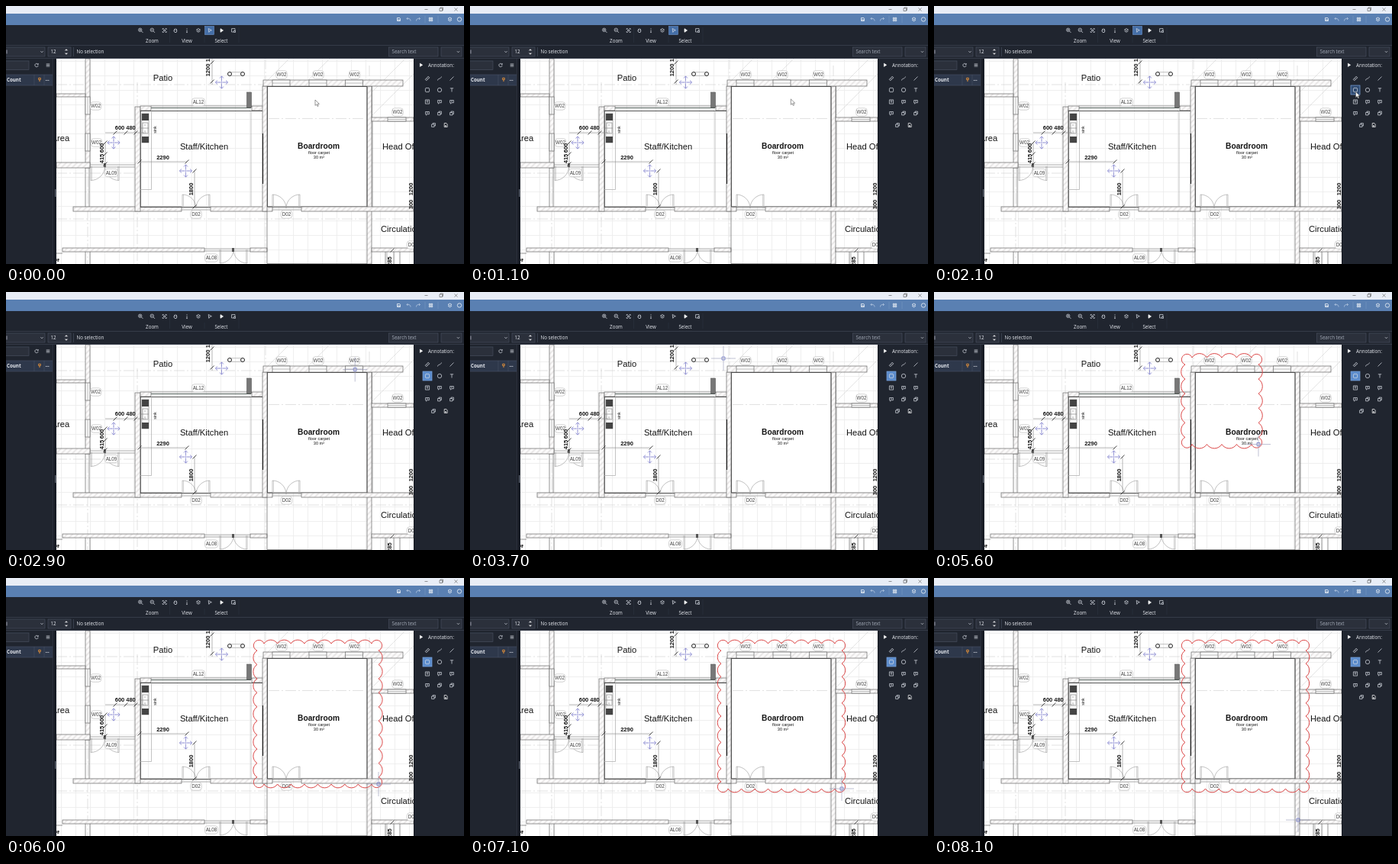
An HTML page that plays this animation: 600x338 px, repeating every 8.2 s.

```html
<!DOCTYPE html>
<html lang="en">
<head>
<meta charset="utf-8">
<title>Revision cloud on a floor plan</title>
<style>
  html, body { margin: 0; width: 100%; height: 100%; overflow: hidden; background: #20252f; }
  svg { display: block; width: 600px; height: 338px; }
  .ui { font-family: "Open Sans", sans-serif; fill: #e9ecf2; }
  .plan { font-family: "Liberation Sans", Arial, sans-serif; fill: #151515; }
</style>
</head>
<body>
<svg id="stage" viewBox="0 0 600 338">
  <defs>
    <pattern id="hatch" width="5" height="5" patternUnits="userSpaceOnUse" patternTransform="rotate(45)">
      <rect width="5" height="5" fill="#fbfafa"/><path d="M1 0V5" stroke="#cbc6c6" stroke-width=".7"/>
    </pattern>
    <pattern id="tiles" x="72" y="72" width="19" height="19" patternUnits="userSpaceOnUse">
      <path d="M.5 0V19M0 .5H19" stroke="#ebebeb" stroke-width=".8"/>
    </pattern>
    <clipPath id="sheet"><rect x="66" y="69" width="468" height="269"/></clipPath>
  </defs>
</svg>
<script>
const stage = document.getElementById('stage');

// Markup helpers
const path = (d, stroke = '#666', width = .7, extra = '') =>
  `<path d="${d}" fill="none" stroke="${stroke}" stroke-width="${width}" ${extra}/>`;
const rect = (x, y, w, h, fill, extra = '') =>
  `<rect x="${x}" y="${y}" width="${w}" height="${h}" fill="${fill}" ${extra}/>`;
const text = (x, y, str, size, { anchor = 'middle', bold, turn, kind = 'plan', fill } = {}) =>
  `<text class="${kind}" x="${x}" y="${y + size * .36}" font-size="${size}" text-anchor="${anchor}"` +
  (bold ? ' font-weight="700"' : '') + (fill ? ` style="fill:${fill}"` : '') +
  (turn ? ` transform="rotate(-90 ${x} ${y})"` : '') + `>${str}</text>`;
const ui = (x, y, str, opts) => text(x, y, str, 6.2, { kind: 'ui', anchor: 'start', ...opts });
const at = (x, y, body, extra = '') => `<g transform="translate(${x} ${y})" ${extra}>${body}</g>`;

const wall = (x, y, w, h) => rect(x, y, w, h, 'url(#hatch)', 'stroke="#666" stroke-width=".7"');
// Window across a wall, glazed along its longer side
const pane = (x, y, w, h) => rect(x, y, w, h, '#fff', 'stroke="#666" stroke-width=".7"') +
  path(w > h ? `M${x} ${y + h / 2}h${w}` : `M${x + w / 2} ${y}v${h}`, '#888', .6);
const dim = (x, y, str, turn) => text(x, y, str, 7.5, { bold: true, turn });
const tag = (x, y, str) => {
  const w = str.length > 3 ? 17 : 14.5;
  return rect(x - w / 2, y - 5.2, w, 10.4, '#fff', 'rx="3.5" stroke="#b4b4b4" stroke-width=".6"') +
    text(x, y, str, 6.3, { fill: '#444' });
};
const tick = (x, y) => path(`M${x - 2.5} ${y + 2.5}l5 -5`, '#222', .8);
const moveMark = (x, y) => at(x, y, [0, 90, 180, 270].map(a =>
  path('M0 -2V-8M-2.5 -5.5L0 -8.2L2.5 -5.5', '#8c8cd2', .9, `transform="rotate(${a})"`)).join('') +
  path('M-3 0H3M0 -3V3', '#a0a0da', .7));
// Double door hinged at both ends; dir is the side it opens to
const doors = (x, y, w, dir) => {
  const r = w / 2, h = dir * r, s = dir < 0 ? [1, 0] : [0, 1];
  return path(`M${x} ${y}v${h}A${r} ${r} 0 0 ${s[0]} ${x + r} ${y}A${r} ${r} 0 0 ${s[0]} ${x + w} ${y + h}v${-h}`, '#999', .6) +
    path(`M${x + 1.5} ${y}v${h}M${x + w - 1.5} ${y}v${h}`, '#aaa', .5);
};

function drawPlan() {
  const dash = 'stroke-dasharray="14 3 2 3"';
  return rect(66, 69, 468, 269, '#fff') + rect(66, 69, 468, 269, 'url(#tiles)') +
    rect(342, 105, 131, 158, '#fff') +
    path('M66 103H337M66 219H170M66 279H534M107 69V338M172 100V338M340 69V338M476 78V338M344 147.5H471', '#cfcfcf', .6, dash) +
    path('M343 97L371 69M396 97L424 69M480 112L523 69M480 143L534 89', '#d2d2d2', .6) +
    // Outer rooms
    wall(104, 69, 6, 143) + wall(66, 205, 44, 7) + wall(66, 115, 38, 4) +
    pane(104, 119, 6, 23) + pane(104, 167, 6, 23) +
    path('M104 212V263M109 212V263') + wall(88, 263, 142, 6) +
    wall(74, 317, 186, 5) + wall(320, 317, 22, 5) + path('M104 322V338M110 322V338M66 324H74') +
    // Kitchen
    wall(169, 132, 7, 137) + wall(176, 131, 14, 6) + wall(322, 131, 18, 6) +
    path('M176 137.5H337M176 263.5H336M176.3 137V263', '#444', .9) + path('M190 131H322') +
    path('M190 133.5H321', '#53605b', 1.2) +
    wall(268, 263, 81, 6) + path('M230 264H268M230 267H268', '#888') +
    path('M190.5 137V240.5H176M321 137V263', '#aaa') +
    rect(178, 141, 9, 38, '#fff', 'stroke="#777" stroke-width=".6"') +
    rect(178, 141, 9, 9, '#444') + rect(178, 171, 9, 8, '#444') +
    path('M179 153H186V167H179ZM177 160H187M181 156h2M181 164h2', '#888', .7) +
    text(195, 162, 'sink', 5.4, { turn: true }) +
    rect(315.5, 113, 6, 20, '#777', 'stroke="#555" stroke-width=".6"') +
    // Boardroom
    wall(336, 105, 6, 164) + wall(473, 105, 6, 233) + wall(337, 97, 183, 8) +
    [349, 397, 444.5].map(x => pane(x, 97, 23, 8)).join('') +
    path('M342.5 105V263H473V105.5H342', '#444', .9) + path('M336.5 167V233', '#222', 1.2) +
    wall(387, 263, 147, 6) + path('M349 264H387M349 267H387', '#888') +
    path('M342 269V337.5H473') +
    // Right side rooms
    wall(479, 146, 55, 5) + pane(500, 146, 24, 5) +
    path('M479.5 105V146M480 151V263') + wall(479, 317, 55, 5) + path('M497 322V338M508 322V338M516 322V338') +
    // Doors
    doors(231, 265, 36, -1) + doors(349, 265, 36, -1) + doors(111, 210, 37, 1) + doors(280, 319, 36, 1) +
    path('M110 208H169M110 211H169M260 318H320M260 321H320', '#888') +
    rect(128, 206, 3, 5, '#555') + rect(296, 317, 3, 5, '#555') +
    // Bench and move marks
    path('M293 86.7H310M293 91.3H310', '#999', .6) +
    [293, 310].map(x => `<circle cx="${x}" cy="89" r="2.5" fill="#fff" stroke="#222"/>`).join('') +
    moveMark(141, 179) + moveMark(282.5, 100) + moveMark(235.5, 216) +
    // Tags and dimensions
    [[361, 90, 'W02'], [409, 90, 'W02'], [456.5, 90, 'W02'], [117.5, 131, 'W02'], [118.5, 179, 'W02'],
     [513, 139, 'W02'], [252, 126, 'AL12'], [138, 218.5, 'AL09'], [269, 330, 'AL08'], [249, 273, 'D02'],
     [367.5, 273, 'D02'], [532.5, 313, 'D02']].map(t => tag(...t)).join('') +
    path('M130 166H184M176 204H237M247 216V263M130 179V212M270 69V103M499 322V338', '#888', .6) +
    [[143, 166], [157, 166], [170, 166], [175, 204], [237, 204], [247, 216], [247, 263], [130, 179],
     [130, 194], [130, 207], [270, 74], [270, 99], [506, 320]].map(p => tick(...p)).join('') +
    dim(149, 159, '600') + dim(163.5, 159, '480') + dim(205.5, 198, '2290') + dim(242, 240, '1800', 1) +
    dim(125, 200, '415', 1) + dim(125, 186, '600', 1) + dim(264.5, 84, '1200', 1) + dim(264.5, 65, '1200', 1) +
    dim(530.5, 240, '1200', 1) + dim(530.5, 260, '300', 1) + dim(502, 334.5, '285', 1) + dim(67.5, 333, '4', 1) +
    // Room names
    text(205.5, 94, 'Patio', 11.2) + text(259.5, 183.5, 'Staff/Kitchen', 11.2) +
    text(409.5, 183.5, 'Boardroom', 10.2, { bold: true }) + text(410, 191.7, 'floor carpet', 5.6) +
    text(410, 198.3, '30 m²', 5.6) + text(59.5, 173, 'Area', 11.2, { anchor: 'start' }) +
    text(493, 183.5, 'Head Office', 11.2, { anchor: 'start' }) +
    text(491, 292, 'Circulation', 11.2, { anchor: 'start' });
}

const glyphs = {
  zoomIn: 'M-3 -.7a2.2 2.2 0 1 0 4.4 0a2.2 2.2 0 1 0 -4.4 0M1 1L3 3M-2 -.7H.4M-.8 -1.9V.5',
  zoomOut: 'M-3 -.7a2.2 2.2 0 1 0 4.4 0a2.2 2.2 0 1 0 -4.4 0M1 1L3 3M-2 -.7H.4',
  fit: 'M-2.5 -1V-2.5H-1M1 -2.5H2.5V-1M2.5 1V2.5H1M-1 2.5H-2.5V1M-1 -1H1V1H-1Z',
  hand: 'M-1.5 .5V-2M0 0V-2.8M1.5 .5V-2M-2.5 0L-1 2.5H1.2L2 0',
  info: 'M0 -2.8V-1.6M0 -.6V2.8M-.7 2.6H.7',
  layers: 'M0 -2.5L2.5 -1L0 .5L-2.5 -1ZM-2.5 .8L0 2.3L2.5 .8',
  pointer: 'M-1.8 -2.5L2.4 -.2L0 .4L-1.2 2.4Z',
  play: 'M-1.5 -2.3L2 0L-1.5 2.3Z',
  area: 'M-2.4 -2.4H2V1M-2.4 -2.4V2H0M.5 .5H2.5V2.5H.5Z',
  ruler: 'M-2.8 1.2L1.2 -2.8L2.8 -1.2L-1.2 2.8ZM-1 0L0 1M.5 -1.5L1.5 -.5',
  curve: 'M-2.5 2.5C-2 -1 1 1.5 2.5 -2.5',
  slash: 'M-2.5 2.5L2.5 -2.5',
  box: 'M-2 -2.6H2L2.6 -2V2L2 2.6H-2L-2.6 2V-2Z',
  ring: 'M-2.7 0a2.7 2.7 0 1 0 5.4 0a2.7 2.7 0 1 0 -5.4 0',
  type: 'M-2.2 -2.2H2.2M0 -2.2V2.5',
  textBox: 'M-2.6 -2.6H2.6V2.6H-2.6ZM-1.3 -1.2H1.3M0 -1.2V1.5',
  note: 'M-2.4 -2H2.4V1.2H0L-1.6 2.6V1.2H-2.4ZM-1 -.5H1',
  stamp: 'M-2.4 -1H1V2.4H-2.4ZM-1 -1V-2.4H2.4V1H1',
  page: 'M-1.8 -2.5H1L2.2 -1V2.5H-1.8ZM0 0V2M-1 1H1',
  save: 'M-2 -2H1.3L2 -1.2V2H-2ZM-.9 2V.3H.9V2',
  undo: 'M2.5 2C2.5 -1 0 -1.2 -2.4 -1M-1 -2.5L-2.5 -1L-1 .5',
  redo: 'M-2.5 2C-2.5 -1 0 -1.2 2.4 -1M1 -2.5L2.5 -1L1 .5',
  grid: 'M-2.2 -2.2H-.4V-.4H-2.2ZM.4 -2.2H2.2V-.4H.4ZM-2.2 .4H-.4V2.2H-2.2ZM.4 .4H2.2V2.2H.4Z',
  refresh: 'M2 -1A2.2 2.2 0 1 0 2.2 .6M2.2 -2.5V-.8H.6',
  menu: 'M-2.3 -1.6H2.3M-2.3 0H2.3M-2.3 1.6H2.3',
  down: 'M-1.6 -.8L0 .8L1.6 -.8',
  up: 'M-1.6 .8L0 -.8L1.6 .8'
};
const icon = (x, y, name, color = '#dce0e8', fill) =>
  at(x, y, path(glyphs[name], color, .7, fill ? `style="fill:${color}"` : ''));
const iconRow = (y, x, step, names) => names.split(' ').map((n, i) => icon(x + i * step, y, n)).join('');
const field = (x, y, w, h) => rect(x, y, w, h, '#2b303b', 'stroke="#4b5363" stroke-width=".6"');

function drawApp() {
  return rect(0, 0, 600, 338, '#20252f') + rect(0, 0, 600, 10, '#e8edf6') + rect(0, 10, 600, 15, '#5a80b2') +
    path('M548.5 4.5H552.5M568 3H571.5V6.5H568ZM569 3V2H572.5V5.5H571.5M587.5 2.5L591.5 6.5M591.5 2.5L587.5 6.5', '#555', .6) +
    icon(514.5, 17.5, 'save', '#fff') + icon(527.5, 17.5, 'undo', '#c6d5ea') + icon(540, 17.5, 'redo', '#c6d5ea') +
    icon(556.5, 17.5, 'grid', '#fff') + icon(581.5, 17.5, 'layers', '#fff') + icon(594, 17.5, 'ring', '#fff') +
    path('M549 13V22M566 13V22', '#7898c2', .6) +
    rect(260.5, 26.5, 12, 11, '#456fa8', 'id="selectTool" stroke="#7ba4dd" stroke-width=".5"') +
    iconRow(32, 176.5, 15.6, 'zoomIn zoomOut fit') + iconRow(32, 222, 15, 'hand info layers pointer') +
    icon(282.5, 32, 'play', '#fff', true) + icon(298, 32, 'area') +
    ui(191.5, 45.3, 'Zoom', { anchor: 'middle' }) + ui(237, 45.3, 'View', { anchor: 'middle' }) +
    ui(282, 45.3, 'Select', { anchor: 'middle' }) +
    path('M0 51.5H600M0 68.5H600', '#3a414e', .8) + path('M214.5 28V48M260 40V48M305 28V48', '#2d3440', .6) +
    field(-4, 54, 55, 12) + icon(47, 60, 'down') + path('M1 57.5V62.5', '#ccd', .7) +
    field(55, 54, 30, 12) + ui(58.5, 60, '12') + icon(79, 57.5, 'up', '#fff', true) + icon(79, 62.5, 'down', '#fff', true) +
    path('M88.5 54V66', '#4b5363', .6) + ui(92.5, 60, 'No selection') +
    field(501.5, 54, 64.5, 12) + ui(505.5, 60, 'Search text', { fill: '#a4abb8' }) +
    field(570, 54, 27, 12) + icon(592.5, 60, 'down') +
    // Left panel
    field(-4, 72, 34, 11.5) + icon(40, 77.5, 'refresh') + icon(55, 77.5, 'menu') +
    rect(0, 90, 61, 14, '#2e384b') + path('M0 90H61M0 104H61M37 90V104M50 90V104', '#475166', .6) +
    ui(1, 96.5, 'Count', { bold: true }) + at(44, 96.5, path('M-1.3 -2.2H1.3V0H-1.3ZM0 0V2.6', '#d98b3a', 1)) +
    ui(51.5, 95.5, '...', { bold: true }) + rect(61, 69, 5, 269, '#191d26') +
    path('M61.5 69V338', '#3a414e', .6) + path('M64.8 240V250', '#9aa2b2', .8) +
    // Right panel
    path('M534.5 69V338', '#151921', 1) + path('M542.3 75L545.8 77.3L542.3 79.6Z', '#fff', .4, 'style="fill:#fff"') +
    ui(553, 77.5, 'Annotation:') +
    rect(546, 104, 12, 12, '#5b8bcb', 'id="cloudTool" stroke="#7ba4dd" stroke-width=".7"') +
    iconRow(95, 552, 16, 'ruler curve slash') + iconRow(110, 552, 16, 'box ring type') +
    iconRow(125.5, 552, 16, 'textBox note note') + iconRow(140.5, 552, 16, 'note stamp stamp') +
    icon(560, 156, 'stamp') + icon(576, 156, 'page', '#fff');
}

stage.insertAdjacentHTML('beforeend', drawApp() + `<g clip-path="url(#sheet)">${drawPlan()}` +
  path('', '#dc4646', 1, 'id="cloud"') +
  at(0, 0, path('M-16 0H16M0 -16V16', '#9697b8', .6) + path('M-2 -2H2V2H-2Z', '#7379c4', .8), 'id="cross"') + '</g>' +
  at(0, 0, path('M0 0V7.4L1.8 5.8L3 8.5L4.3 7.9L3.1 5.3H5.4Z', '#555', .6, 'style="fill:#fff"'), 'id="arrow"'));

const [cloud, cross, arrow, selectTool, cloudTool] =
  ['cloud', 'cross', 'arrow', 'selectTool', 'cloudTool'].map(id => document.getElementById(id));

// Pointer keys: time, x, y and the easing that leads there
const smooth = k => k * k * (3 - 2 * k), linear = k => k, easeIn = k => k ** 1.5;
const keys = [
  [0, 405, 123], [900, 405, 123, linear], [1900, 552.5, 112.5, smooth], [2400, 552.5, 112.5, linear],
  [3500, 332, 87, smooth], [4500, 332, 87, linear], [4700, 329, 86, smooth], [5200, 362, 129, easeIn],
  [6000, 488, 270, linear], [6200, 487, 276, linear], [7800, 487, 276, linear], [8100, 477, 317, easeIn]
];
function pointer(t) {
  const i = keys.findIndex(k => k[0] > t);
  if (i < 0) return keys.at(-1).slice(1, 3);
  const [t0, x0, y0] = keys[i - 1], [t1, x1, y1, ease] = keys[i];
  const k = ease((t - t0) / (t1 - t0));
  return [x0 + (x1 - x0) * k, y0 + (y1 - y0) * k];
}

// Scalloped box: even bumps along each side and a rounder one on each corner
function cloudPath(x0, y0, x1, y1) {
  const w = x1 - x0, h = y1 - y0, inset = Math.min(9, w / 4, h / 4), r = inset * .78;
  let d = `M${x0 + inset} ${y0}`;
  for (const [ux, uy, side] of [[1, 0, w], [0, 1, h], [-1, 0, w], [0, -1, h]]) {
    const len = side - 2 * inset, n = Math.max(1, Math.round(len / 18)), step = len / n;
    d += `a${step * .59} ${step * .59} 0 0 1 ${ux * step} ${uy * step}`.repeat(n) +
      `a${r} ${r} 0 1 1 ${(ux - uy) * inset} ${(uy + ux) * inset}`;
  }
  return d + 'Z';
}

const LOOP = 8200, STEP = 100, DRAG_START = 4700, DRAG_END = 6300;
const show = (el, on) => el.setAttribute('visibility', on ? 'visible' : 'hidden');

function frame() {
  const t = Math.floor(performance.now() % LOOP / STEP) * STEP;
  const [x, y] = pointer(t), drawing = t >= 2300, overPlan = drawing && x < 534;
  for (const el of [cross, arrow]) el.setAttribute('transform', `translate(${x} ${y})`);
  show(cross, overPlan);
  show(arrow, !overPlan);
  show(selectTool, !drawing);
  show(cloudTool, t >= 1900);
  cloudTool.setAttribute('fill', drawing ? '#5b8bcb' : '#2f4a70');
  cloud.setAttribute('d', t > DRAG_START ? cloudPath(329, 86, ...pointer(Math.min(t, DRAG_END))) : '');
  requestAnimationFrame(frame);
}
frame();
</script>
</body>
</html>
```
